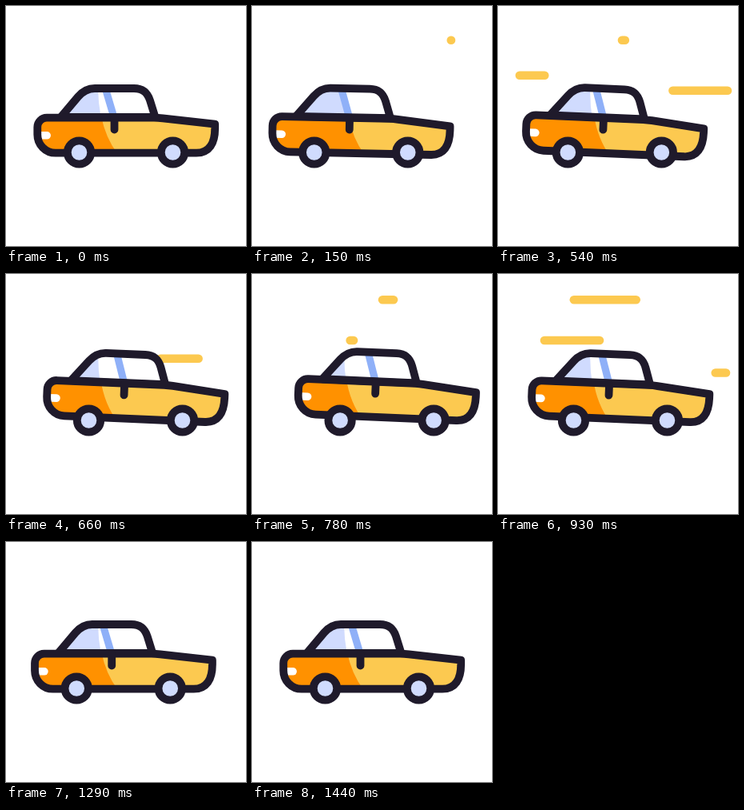
Animation, 300 px wide and 300 px high, one loop 1500 ms. Source, as an HTML page:

```html
<!DOCTYPE html>
<html lang="en">
<head>
<meta charset="utf-8">
<title>Car</title>
<style>
  html, body { margin: 0; width: 100%; height: 100%; overflow: hidden; background: #fff; }
  svg { display: block; width: 100%; height: 100%; }
  .ink { stroke: #1f1a2b; stroke-width: 9.8; stroke-linecap: round; stroke-linejoin: round; }
</style>
</head>
<body>
<svg viewBox="0 0 300 300">
  <defs>
    <path id="hull" d="M51 139.7H185Q190 139.7 196 140.4L261.2 147.7V153C261.2 172 254 183.7 238 183.7H62A22.7 23 0 0 1 39.3 160.7V151.4A11.7 11.7 0 0 1 51 139.7Z"/>
    <path id="cabin" d="M68.5 139L90 113.5Q99 103 111 103H160C172 103 177 109 180 118L186.5 139Z"/>
    <clipPath id="hullClip"><use href="#hull"/></clipPath>
    <clipPath id="cabinClip"><use href="#cabin"/></clipPath>
  </defs>
  <g id="streaks" stroke="#fcc950" stroke-width="10.6" stroke-linecap="round"></g>
  <g id="body">
    <g clip-path="url(#cabinClip)">
      <rect x="60" y="95" width="135" height="50" fill="#fff"/>
      <path id="glassShade" d="M0 95H115Q114.5 121 120 145H0Z" fill="#d0dbfe"/>
      <path d="M118 98H127.5L140 140H130.5Z" fill="#8fb0f8"/>
    </g>
    <g clip-path="url(#hullClip)">
      <rect x="30" y="130" width="240" height="60" fill="#fcc950"/>
      <path id="paintShade" d="M0 135H118.5Q124 166 142 188H0Z" fill="#ff9100"/>
      <rect x="36" y="157" width="20" height="9.6" rx="4.8" fill="#fff"/>
    </g>
    <g class="ink" fill="none">
      <use href="#cabin"/>
      <use href="#hull"/>
      <path d="M135.5 141V154.5"/>
    </g>
  </g>
  <g id="wheels" class="ink" fill="#d0dbfe">
    <circle cx="91.5" cy="183" r="14.7"/>
    <circle cx="208.5" cy="183" r="14.7"/>
  </g>
</svg>
<script>
const LOOP = 1500;
const REACH = 94, GROW = 290, SHRINK = 240, LAG = 190;
const $ = id => document.getElementById(id);
const clamp = v => Math.min(1, Math.max(0, v));
const ease = v => (1 - Math.cos(Math.PI * clamp(v))) / 2;

// Drop back, surge ahead, drop back, settle
const drift = t =>
  -27.2 * ease(t / 300)
  + 45.8 * ease((t - 300) / 480)
  - 28.3 * ease((t - 780) / 283)
  + 9.7 * ease((t - 1063) / 377);

const lean = t => 2.45 * ease(t / 310) * (1 - ease((t - 900) / 380));

// The leaning body rises as the car surges, slightly late
const heave = t => -0.078 * lean(t) * (drift(t - 30) + 4.3);

function addStreak(start, right, y) {
  const el = document.createElementNS("http://www.w3.org/2000/svg", "line");
  el.setAttribute("y1", y);
  el.setAttribute("y2", y);
  $("streaks").append(el);
  return t => {
    const head = ease((t - start) / GROW);
    const tail = ease((t - start - LAG) / SHRINK);
    el.setAttribute("x1", right - REACH * head);
    el.setAttribute("x2", right - REACH * tail);
    el.setAttribute("visibility", head > 0 && tail < 1 ? "visible" : "hidden");
  };
}

const streaks = [
  addStreak(142, 249, 42.7),
  addStreak(205, 121, 86.7),
  addStreak(352, 287, 105.7),
  addStreak(708, 177, 32.3),
  addStreak(741, 127, 83),
  addStreak(860, 285, 123.5)
];

const move = (id, value) => $(id).setAttribute("transform", value);

function draw(t) {
  const x = drift(t), tilt = lean(t);
  move("body", `translate(${x} ${heave(t)}) rotate(${tilt} 150 155)`);
  move("wheels", `translate(${x} 0)`);
  // Shading stays almost still while the car slides beneath it
  move("glassShade", `translate(${-x - 0.8 * tilt} 0)`);
  move("paintShade", `translate(${-1.1 * x} 0)`);
  for (const update of streaks) update(t);
}

const begin = performance.now();
function frame() {
  draw((performance.now() - begin) % LOOP);
  requestAnimationFrame(frame);
}
frame();
</script>
</body>
</html>
```
